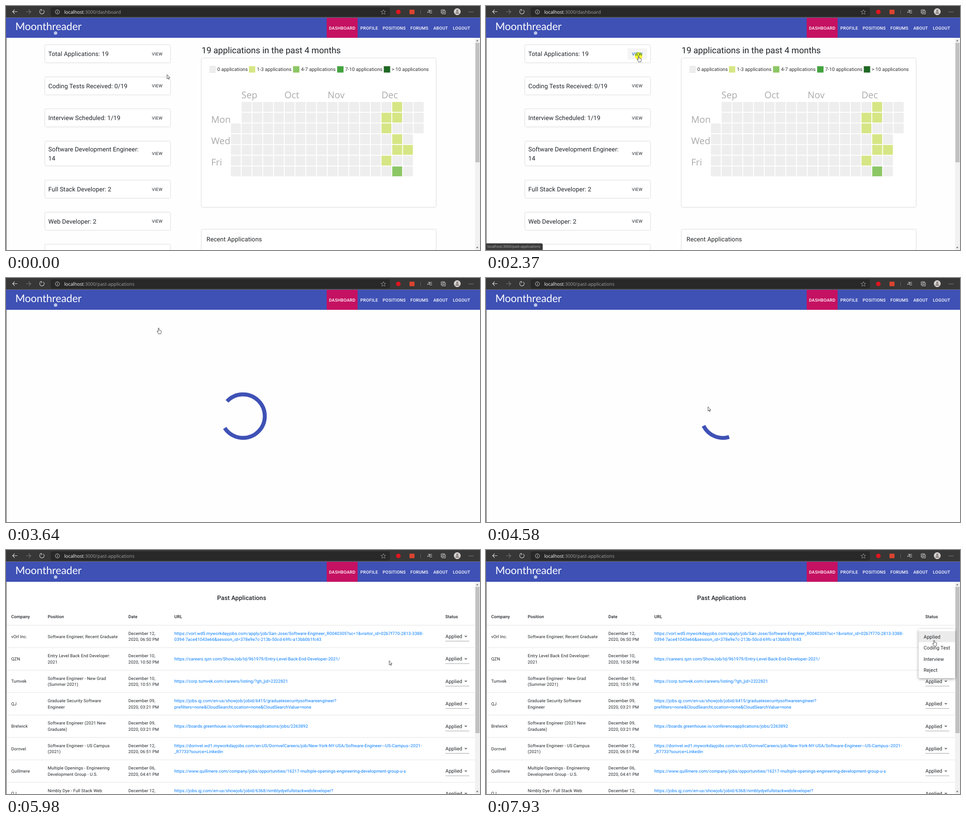
An HTML page that plays this animation: 1042x537 px, repeating every 8 s.

```html
<!DOCTYPE html>
<html lang="en">
<head>
<meta charset="utf-8">
<title>Job dashboard</title>
<style>
  html, body { margin: 0; height: 100%; overflow: hidden; background: #fff; }
  svg { display: block; width: 100vw; height: 100vh; }
  text { font: 9.48px Roboto, sans-serif; letter-spacing: .0107em; fill: #212529; white-space: pre; text-rendering: geometricPrecision; }
  .h6 { font-size: 13.54px; letter-spacing: .0075em; }
  .h3 { font-size: 18.96px; letter-spacing: 0; }
  .body { font-size: 10.83px; letter-spacing: .0094em; }
  .legend { font-size: 10.75px; letter-spacing: 0; fill: #333; }
  .btn { letter-spacing: .0286em; }
  .bold { font-weight: 500; }
  .nav { font-weight: 500; fill: #fff; }
  .brand { font: 23px Lato, sans-serif; fill: #fff; letter-spacing: 0; }
  .month { font: 20.3px "Open Sans", sans-serif; letter-spacing: 0; fill: #aaa; }
  .address { font: 10.25px "Open Sans", sans-serif; letter-spacing: 0; fill: #fff; }
  .tip { font: 7.74px "Open Sans", sans-serif; letter-spacing: 0; fill: #b4b4b4; }
  .link { fill: #007bff; }
  .link.hover { fill: #0056b3; text-decoration: underline; }
  .card { fill: #fff; filter: drop-shadow(0 .8px .8px rgba(0,0,0,.33)); }
  .paper { fill: #fff; filter: drop-shadow(0 2px 3px rgba(0,0,0,.38)); }
  .icon { fill: none; stroke: #ddd; stroke-width: 1.1; }
  .pointer { fill: #fff; stroke: #222; stroke-width: .8; stroke-linejoin: round; }
</style>
</head>
<body>
<svg id="stage" viewBox="0 0 1042 537" preserveAspectRatio="none"></svg>
<script>
const LOOP = 8000, PAGE_LOADING = 2940, PAGE_TABLE = 5110;
const ROW = 49.4, ROWS_TOP = 165.5;
const HOVERED_URL = 'https://corp.tumvek.com/careers/listing/?gh_jid=2322821';

const text = (x, y, s, cls = '', extra = '') =>
  `<text x="${x}" y="${y}" class="${cls}" ${extra}>${s.replace(/&/g, '&amp;').replace(/>/g, '&gt;')}</text>`;
const rect = (x, y, w, h, fill, extra = '') =>
  `<rect x="${x}" y="${y}" width="${w}" height="${h}" fill="${fill}" ${extra}/>`;
const path = (d, extra = 'class="icon"') => `<path d="${d}" ${extra}/>`;
const circle = (x, y, r, extra) => `<circle cx="${x}" cy="${y}" r="${r}" ${extra}/>`;
const group = (id, body, extra = '') => `<g id="${id}" ${extra}>${body}</g>`;
const lines = (x, mid, s, cls) => {
  const parts = s.split('|');
  return parts.map((p, i) => text(x, mid + 3.4 + (i - (parts.length - 1) / 2) * 13.6, p, cls)).join('');
};

function browserBar() {
  return rect(0, 0, 1042, 25.5, '#373737') +
    rect(98, 3, 746, 20, '#282828', 'rx="2.5"') +
    path('M25 12.5H14.5M19 8l-4.5 4.5L19 17') +
    path('M44 12.5H54.5M50 8l4.5 4.5L50 17', 'class="icon" style="stroke:#777"') +
    path('M76 8.6A5 5 0 1 0 82 8.6M75 7.8h3.4v3.4') +
    circle(113, 13, 4.6, 'class="icon" style="stroke-width:.9"') + path('M113 12.3v3.2M113 10.2v1') +
    `<text x="128" y="16.8" class="address">localhost<tspan id="route" fill="#a0a0a0"></tspan></text>` +
    path('M829.5 8l1.5 3.4 3.7.4-2.8 2.5.8 3.7-3.2-1.9-3.2 1.9.8-3.7-2.8-2.5 3.7-.4z', 'class="icon" style="stroke:#aaa;stroke-width:.8"') +
    circle(862.5, 13, 5, 'fill="#e0151f"') + rect(887, 8, 11, 10, '#d9442f') +
    rect(911, 8, 1, 10, '#5a5a5a') +
    path('M931 12.5h5.5M931 15.5h5.5M930 9.5h6.5M928.5 8l1 2.2 2.3.3-1.7 1.5.4 2.3-2-1.1-2 1.1.4-2.3', 'class="icon" style="stroke-width:.9"') +
    path('M959 15.5h-2.3V8.2h7.3v2M959 10.3h7v7.2h-7zM962.5 11.8v4.2M960.4 13.9h4.2', 'class="icon" style="stroke-width:.9"') +
    circle(992, 12.5, 7.5, 'fill="#d6d2cf"') + circle(992, 10.5, 2.5, 'fill="#8a8583"') +
    path('M987.5 17a4.5 3.8 0 0 1 9 0z', 'fill="#8a8583"') +
    [1018.5, 1022.5, 1026.5].map(x => circle(x, 13, .8, 'fill="#ddd"')).join('');
}

function appBar() {
  const items = [[779, 'PROFILE'], [828, 'POSITIONS'], [889, 'FORUMS'], [939.5, 'ABOUT'], [982.5, 'LOGOUT']];
  return rect(0, 25.5, 1042, 44.5, '#3f51b5') + rect(705, 26, 68, 44, '#c51162') +
    text(20.5, 53, 'Moonthreader', 'brand') + circle(109, 59.5, 3.8, 'fill="#b9c6e6"') +
    [[710, 'DASHBOARD'], ...items].map(([x, s]) => text(x, 51.5, s, 'nav btn')).join('');
}

function scrollBar(thumb) {
  return rect(1031, 70, 11, 467, '#f1f1f1') + rect(1032, 81, 9, thumb, '#c1c1c1') +
    path('M1033.5 77.5h5l-2.5-3z', 'fill="#666"') + path('M1033.5 530.5h5l-2.5 3z', 'fill="#666"');
}

function dashboard() {
  const cards = [
    [86, 38.5, 'Total Applications: 19'], [156.5, 38.5, 'Coding Tests Received: 0/19'],
    [227, 38.5, 'Interview Scheduled: 1/19'], [298, 53.5, 'Software Development Engineer:|14'],
    [384, 38.5, 'Full Stack Developer: 2'], [454.5, 38.5, 'Web Developer: 2'], [525, 38.5, '']];
  const shades = ['#eee', '#d6e685', '#8cc665', '#44a340', '#1e6823'];
  const legend = [[447, '0'], [534, '1-3'], [631, '4-7'], [728, '7-10'], [830.5, '> 10']];
  const active = { '0,15': 1, '1,14': 1, '1,15': 1, '2,14': 1, '3,15': 1, '4,15': 1, '4,16': 1, '5,14': 1, '6,15': 2 };
  let out = rect(1, 70, 1041, 467, '#fefefe');

  cards.forEach(([y, h, label], i) => {
    const mid = y + h / 2, parts = label.split('|');
    out += rect(86, y, 275, h, '#fff', 'class="card" rx="2"');
    if (!i) out += group('hoverBox',
      rect(311, 93, 43, 25, '#f5f5f5', 'rx="2.5"') +
      `<g clip-path="url(#button)">${circle(335, 111, 0, 'id="ripple" fill="#000"')}</g>`);
    parts.forEach((p, j) => { out += text(93, mid + 4.8 + (j - (parts.length - 1) / 2) * 20, p, 'h6'); });
    if (label) out += text(320.7, mid + 3.4, 'VIEW', 'btn', i ? '' : 'id="view"');
  });

  out += text(430, 104, '19 applications in the past 4 months', 'h3') +
    rect(430, 115, 515, 327.5, '#fff', 'class="card" rx="2"') +
    rect(430, 492, 515, 80, '#fff', 'class="card" rx="2"') +
    text(440.7, 518, 'Recent Applications', 'h6');
  legend.forEach(([x, range], i) => {
    out += rect(x, 132.5, 14, 14, shades[i], i ? '' : 'style="filter:drop-shadow(0 .7px .3px #bbb)"') +
      text(x + 17.5, 143.3, range + ' applications', 'legend');
  });
  [[517.5, 'Sep'], [612, 'Oct'], [707, 'Nov'], [825.5, 'Dec']].forEach(([x, m]) => { out += text(x, 203, m, 'month'); });
  ['Mon', 'Wed', 'Fri'].forEach((d, i) => { out += text(451, 256.5 + i * 47.3, d, 'month'); });
  for (let r = 0; r < 7; r++)
    for (let c = r < 2 ? 1 : 0; c < (r < 3 ? 18 : 17); c++)
      out += rect(494.4 + c * 23.65, 211.2 + r * 23.65, 21.7, 21.7, shades[active[r + ',' + c] || 0]);
  return out + scrollBar(263);
}

function table() {
  const rows = [
    ['vOrl Inc.', 'Software Engineer, Recent Graduate', '12,|2020, 06:50 PM', 'https://vorl.wd5.myworkdayjobs.com/apply/job/San-Jose/Software-Engineer_R0040305?sc=1&visitor_id=02b7f770-2813-3388-|0394-7ace41043e66&session_id=378e9e7c-213b-50cd-69fc-a13bb0b1fc43'],
    ['QZN', 'Entry Level Back End Developer:|2021', '10,|2020, 10:50 PM', 'https://careers.qzn.com/ShowJob/Id/961979/Entry-Level-Back-End-Developer-2021/'],
    ['Tumvek', 'Software Engineer - New Grad|(Summer 2021)', '10,|2020, 10:51 PM', HOVERED_URL],
    ['QJ', 'Graduate Security Software|Engineer', '09,|2020, 03:21 PM', 'https://jobs.qj.com/en-us/showjob/jobid/6415/graduatesecuritysoftwareengineer?|prefilters=none&CloudSearchLocation=none&CloudSearchValue=none'],
    ['Brelwick', 'Software Engineer (2021 New|Graduate)', '09,|2020, 03:21 PM', 'https://boards.greenhouse.io/conferenceapplications/jobs/2263892'],
    ['Dornvel', 'Software Engineer - US Campus|(2021)', '12,|2020, 06:51 PM', 'https://dornvel.wd1.myworkdayjobs.com/en-US/DornvelCareers/job/New-York-NY-USA/Software-Engineer---US-Campus--2021-|_R7733?source=Linkedin'],
    ['Quillmere', 'Multiple Openings - Engineering|Development Group - U.S.', '06,|2020, 04:41 PM', 'https://www.quillmere.com/company/jobs/opportunities/16217-multiple-openings-engineering-development-group-u-s'],
    ['QJ', 'Nimbly Dye - Full Stack Web|Developer', '12,|2020, 06:52 PM', 'https://jobs.qj.com/en-us/showjob/jobid/6368/nimblydyefullstackwebdeveloper?|prefilters=none']];
  const heads = [[11.5, 'Company'], [91.7, 'Position'], [269, 'Date'], [370, 'URL'], [965.7, 'Status']];
  let out = rect(1, 70, 1041, 467, '#fff') +
    text(518, 110, 'Past Applications', 'h6 bold', 'text-anchor="middle"') +
    heads.map(([x, s]) => text(x, 149.8, s, 'bold')).join('');
  rows.forEach(([company, position, date, url], i) => {
    const top = ROWS_TOP + i * ROW, mid = top + ROW / 2;
    out += rect(1, top - .4, 1030, .8, '#dcdcdc') +
      lines(11.5, mid, company) + lines(91.7, mid, position) +
      lines(269, mid, 'December ' + date) + lines(370, mid, url, i == 2 ? 'link target' : 'link') +
      text(966, mid + 3.7, 'Applied', 'body') +
      path(`M1007.4 ${mid - 1.4}h7l-3.5 3.5z`, 'fill="#757575"') +
      rect(966, mid + 10, 52.5, .8, '#8a8a8a', i ? '' : 'id="underline"');
  });
  return out + scrollBar(322);
}

function menu() {
  return rect(951, 174, 80, 108, '#fff', 'class="paper" rx="2.5"') + rect(951, 178.5, 80, 24.4, '#ebebeb') +
    ['Applied', 'Coding Test', 'Interview', 'Reject'].map((s, i) => text(962, 194.8 + i * 24.4, s, 'body')).join('');
}

const stage = document.getElementById('stage');
stage.innerHTML =
  `<clipPath id="button">${rect(311, 93, 43, 25, '#000', 'rx="2.5"')}</clipPath>` +
  rect(0, 0, 1042, 537, '#fefefe') +
  group('dashboard', dashboard()) + group('table', table()) +
  circle(521, 304, 47.9, 'id="spinner" fill="none" stroke="#3f51b5" stroke-width="8.6"') +
  group('menu', menu()) +
  group('tip', path('M0 537V522H0', 'id="tipBox" fill="#3b3b3b" stroke="#555" stroke-width=".5"') + text(3, 532.3, '', 'tip', 'id="tipText"')) +
  rect(0, 25, 1, 512, '#3a3a3a') + appBar() + browserBar() +
  circle(0, 0, 8.3, 'id="press" fill="#ff0" style="mix-blend-mode:multiply" opacity=".8"') +
  path('M0 0V9.4L2.2 7.4 3.6 10.5 4.9 9.9 3.5 6.9H6.3Z', 'id="arrow" class="pointer"') +
  path('M-1 8.2V1a1 1 0 0 1 2 0V5q.9-.8 1.8.2.9-.6 1.7.3 1.2-.2 1.2 1.2V9.3Q5.5 11 4.6 13H-.2Q-1 11-2.6 9-3.8 7.2-2.7 6.9-1.9 6.9-1 8.2Z', 'id="hand" class="pointer"');

const $ = id => document.getElementById(id);
const set = (id, attrs) => { for (const k in attrs) $(id).setAttribute(k, attrs[k]); };
const show = (id, on) => { $(id).style.display = on ? '' : 'none'; };
const clamp = v => Math.min(1, Math.max(0, v));
const smooth = p => p * p * (3 - 2 * p);
const between = (t, a, b) => t >= a && t < b;

const route = [
  [0, 354, 151], [380, 354, 151], [500, 345, 136], [620, 345, 136], [1130, 335.5, 110],
  [3720, 335.5, 110], [4190, 488, 283.5], [5460, 488, 283.5], [6040, 853, 242.5],
  [6300, 853, 242.5], [6930, 985, 198.5], [LOOP, 985, 198.5]];

function pointerAt(t) {
  const i = route.findIndex(k => k[0] > t), [t0, x0, y0] = route[i - 1], [t1, x1, y1] = route[i];
  const p = smooth((t - t0) / (t1 - t0));
  return [x0 + (x1 - x0) * p, y0 + (y1 - y0) * p];
}

// Indeterminate progress ring: grows for half a turn, then its tail catches up.
function drawSpinner(t) {
  const unit = 47.9 / 20.2, phase = (t - PAGE_LOADING) / 1400 % 1;
  const grow = smooth(clamp(phase * 2)), shrink = smooth(clamp(phase * 2 - 1));
  set('spinner', {
    'stroke-dasharray': `${(1 + 99 * grow) * unit} ${200 * unit}`,
    'stroke-dashoffset': -(15 * grow + 110 * shrink) * unit,
    transform: `rotate(${360 * phase} 521 304)`
  });
}

function drawTip(t) {
  const first = between(t, 1280, PAGE_LOADING), second = between(t, 5280, 5860);
  const width = first ? 124.5 : 210.5;
  show('tip', first || second);
  set('tipBox', { d: `M0 537V522.5H${width - 3}q3 0 3 3V537z` });
  $('tipText').textContent = first ? 'localhost:3000/past-applications' : HOVERED_URL;
}

function draw(now) {
  const t = now % LOOP, [x, y] = pointerAt(t);
  const loading = between(t, PAGE_LOADING, PAGE_TABLE);
  const onButton = between(t, 620, 3720) && y < 118;
  const onLink = between(t, 5280, 6040) && x < 615;
  const onSelect = t > 6300 && x > 966 && y < 206;

  show('dashboard', t < PAGE_LOADING);
  show('table', t >= PAGE_TABLE);
  show('spinner', loading);
  if (loading) drawSpinner(Math.min(t, 4890));
  $('route').textContent = t < PAGE_LOADING ? ':3000/dashboard' : ':3000/past-applications';

  show('hoverBox', onButton);
  $('view').style.fill = onButton ? '#0056b3' : '';
  const ripple = clamp((t - 2400) / 450);
  set('ripple', { r: 30 * ripple, opacity: .16 * (1 - ripple) });

  document.querySelector('.target').classList.toggle('hover', onLink);
  set('underline', { height: onSelect ? 1.4 : .8, fill: onSelect ? '#222' : '#8a8a8a' });
  drawTip(t);

  const open = clamp((t - 7470) / 320), grow = 1 - (1 - open) ** 2;
  show('menu', open > 0);
  set('menu', {
    opacity: grow,
    transform: `translate(991 190) scale(${.75 + .25 * grow} ${.5625 + .4375 * grow}) translate(-991 -190)`
  });

  const hand = onButton || onLink || onSelect, at = `translate(${x} ${y})`;
  show('hand', hand);
  show('arrow', !hand);
  set('hand', { transform: at });
  set('arrow', { transform: at });
  show('press', between(t, 2370, 2600) || between(t, 7380, 7600));
  set('press', { cx: x, cy: y });
}

function tick() {
  draw(performance.now());
  requestAnimationFrame(tick);
}
tick();
</script>
</body>
</html>
```
